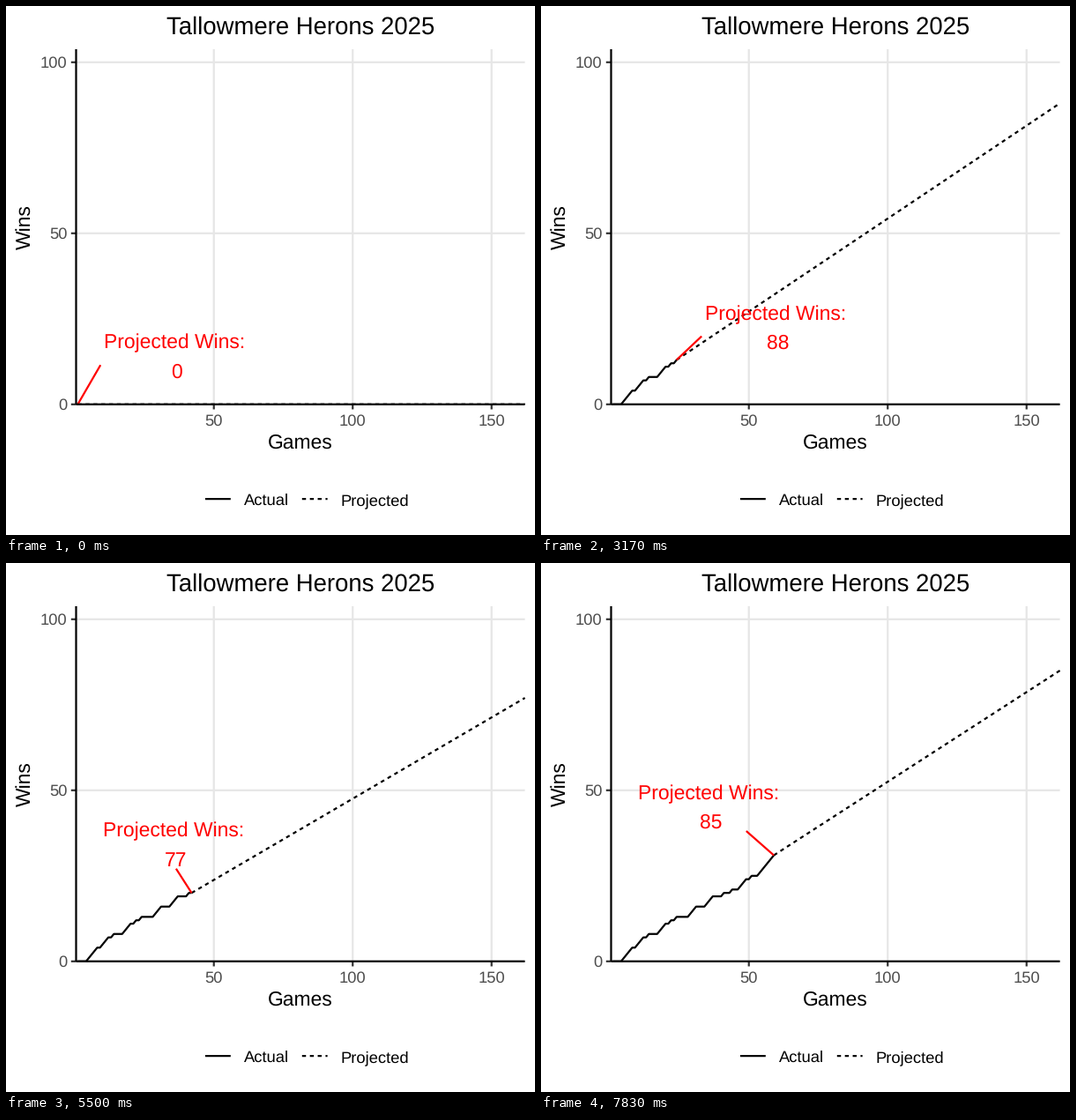
A matplotlib script for the animation above (8000 ms loop, 600 px wide and 600 px high).

```python
import numpy as np
import matplotlib.pyplot as plt
from matplotlib.animation import FuncAnimation
from matplotlib.transforms import Bbox

SIZE, DPI = 600, 100
TICK_MS, LOOP_MS = 40, 8000
STEPS_PER_SEC = 6
SEASON = 162
PT = 72 / DPI
LW = 2.22 * PT
DASH = (0, (2, 2))
SMALL, MEDIUM, LARGE = 18.33, 22.92, 27.5
LEFT, RIGHT, TOP, BOTTOM = 79.5, 588.54, 49, 451.8
LEGEND_Y = 559.1

# Lengths of the alternating losing and winning streaks
STREAKS = [4, 4, 1, 3, 1, 1, 3, 3, 1, 1, 1, 1, 4, 3,
           3, 3, 3, 1, 2, 1, 2, 3, 1, 1, 2, 6]
results = np.repeat(np.arange(len(STREAKS)) % 2, STREAKS)
wins = np.concatenate([[0], np.cumsum(results)])

plt.rcParams.update({
    "font.family": "Liberation Sans",
    "text.hinting": "none",
    "lines.solid_capstyle": "butt",
    "lines.dash_capstyle": "butt",
    "lines.scale_dashes": True,
})


def px(game):
    return RIGHT - 3.15 * (SEASON - np.asarray(game))


def py(win):
    return BOTTOM - 3.88 * np.asarray(win)


fig = plt.figure(figsize=(SIZE / DPI, SIZE / DPI), dpi=DPI, facecolor="white")
ax = fig.add_axes([0, 0, 1, 1])
ax.set_xlim(0, SIZE)
ax.set_ylim(SIZE, 0)
ax.axis("off")


def line(xs=(), ys=(), color="black", z=2, style="-"):
    return ax.plot(xs, ys, color=color, lw=LW, ls=style, zorder=z, snap=False)[0]


def text(x, y, s, size, color="black", ha="center", **kw):
    return ax.text(x, y, s, fontsize=size * PT, color=color, ha=ha,
                   va="baseline", **kw)


def draw_chart():
    for g in (50, 100, 150):
        x = px(g)
        line([x, x], [TOP, BOTTOM], "#e6e6e6", 1)
        line([x, x], [BOTTOM, BOTTOM + 5.7], "#333333", 5)
        text(x, 476, str(g), SMALL, "#4d4d4d")
    for w in (0, 50, 100):
        y = py(w)
        line([LEFT, RIGHT], [y, y], "#e6e6e6", 1)
        line([LEFT - 5.7, LEFT], [y, y], "#333333", 5)
        text(69.5, y + 6.5, str(w), SMALL, "#4d4d4d", "right")
    line([LEFT, LEFT], [TOP, BOTTOM], z=6)
    line([LEFT, RIGHT], [BOTTOM, BOTTOM], z=6)

    mid = (LEFT + RIGHT) / 2
    text(mid, 32, "Tallowmere Herons 2025", LARGE)
    text(mid, 502, "Games", MEDIUM)
    text(27.5, (TOP + BOTTOM) / 2, "Wins", MEDIUM,
         rotation=90, rotation_mode="anchor")

    for x, name, style in ((226, "Actual", "-"), (335.8, "Projected", DASH)):
        line([x, x + 28.8], [LEGEND_Y, LEGEND_Y], style=style)
        text(x + 43.5, LEGEND_Y + 6.7, name, SMALL, ha="left")


draw_chart()
actual = line(z=3)
projected = line(z=3, style=DASH)
leader = line(color="red", z=4)
panel = Bbox([[LEFT, SIZE - BOTTOM], [RIGHT, SIZE - TOP]])
for part in (actual, projected, leader):
    part.set_clip_box(panel)
caption = text(0, 0, "Projected Wins:", MEDIUM, "red", zorder=7)
total = text(0, 0, "", MEDIUM, "red", zorder=7)


def label_center(step, tip_y):
    cx = np.interp(step, [0, 8, 14, 19, 27, 32, 47],
                   [190.7, 216.7, 229.5, 265.7, 252.7, 190, 190])
    lift = np.interp(step, [0, 17, 19, 21, 47], [55, 55.7, 36.6, 55, 55])
    return cx, tip_y - lift


def leader_end(tx, ty, cx, cy):
    """Point on the label box where the leader line meets it."""
    left, bottom = cx - 83.5, cy + 27.5
    if tx < left:
        near = np.hypot(left - tx, ty - bottom)
        far = np.hypot(left - tx, ty - cy)
        return left, bottom + (cy - bottom) * near / far
    d = ty - bottom + 7
    return tx + (cx - tx) * d / np.hypot(cx - tx, d), bottom


def update(tick):
    # The latest step that starts within this tick
    step = int((tick * TICK_MS + TICK_MS - 5) * STEPS_PER_SEC / 1000)
    game = int(round(step * 147 / 119)) + 1
    won = wins[game]
    final = int(round(won * SEASON / game))
    tx, ty = float(px(game)), float(py(won))

    played = np.arange(1, game + 1)
    actual.set_data(px(played), py(wins[played]))
    projected.set_data([tx, px(SEASON)], [ty, py(final)])

    cx, cy = label_center(step, ty)
    ex, ey = leader_end(tx, ty, cx, cy)
    leader.set_data([tx, ex], [ty, ey])
    caption.set_position((cx, cy - 8.5))
    total.set_position((cx + 3, cy + 24.5))
    total.set_text(str(final))
    return actual, projected, leader, caption, total


anim = FuncAnimation(fig, update, frames=LOOP_MS // TICK_MS, interval=TICK_MS,
                     repeat=True, repeat_delay=0, blit=False)
plt.show()
```
